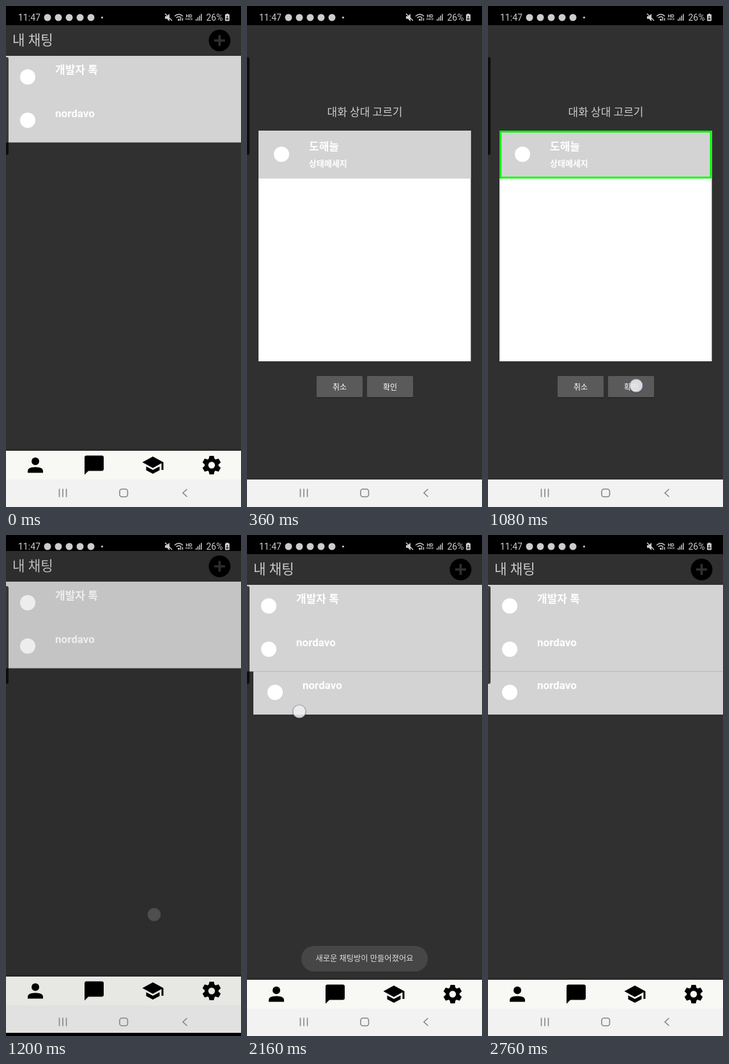
Write an HTML page that moves like this. It is 368 px wide and 784 px high and loops after 3.12 s.

```html
<!DOCTYPE html>
<html lang="ko">
<head>
<meta charset="utf-8">
<title>채팅</title>
<style>
html, body { margin: 0; width: 100%; height: 100%; overflow: hidden; background: #000; }
svg { display: block; width: 368px; height: 784px; }
text { font-family: Roboto, "Noto Sans CJK KR", "Noto Sans CJK", sans-serif; }
.bold { font-weight: 700; }
.mid { text-anchor: middle; }
.line { fill: none; stroke: #ccc; stroke-width: 1.4; }
</style>
</head>
<body>
<svg id="stage" viewBox="0 0 368 784"></svg>
<script>
const W = 368, H = 784, LOOP = 3120, STEP = 120, LAST = 2760;
const BG = '#303030', PALE = '#d3d3d3', INK = '#ccc', TAB = '#f8f8f4';
const ROW = 203 / 3;

const rect = (x, y, w, h, fill, more = '') =>
  `<rect x="${x}" y="${y}" width="${w}" height="${h}" fill="${fill}" ${more}/>`;
const circle = (x, y, r, fill, more = '') =>
  `<circle cx="${x}" cy="${y}" r="${r}" fill="${fill}" ${more}/>`;
const text = (x, y, size, fill, str, cls = '') =>
  `<text x="${x}" y="${y}" font-size="${size}" fill="${fill}" class="${cls}">${str}</text>`;
const path = (d, more = '') => `<path d="${d}" ${more}/>`;
const group = (id, body) => `<g id="${id}">${body}</g>`;
const times = (n, make) => Array.from({ length: n }, (_, i) => make(i)).join('');

// Tab icons, drawn around their own centre
const person = circle(0, -6, 6, '#000') + path('M-12 12v-3q0-6 12-6t12 6v3z');
const bubble = rect(-15, -15, 30, 24, '#000', 'rx="3"') + path('M-15-12V15l7-7z');
const cap = path('M-10.500 2v6L0 13.500 10.500 8V2L0 7.500zM0-13.500L-16.500-4.500 0 4.500 13.500-3V7.500h3v-12z'.replace(/\.500/g, '.5'));
const gear =
  times(6, i => path('M-5-8L-3.4-14.5H3.4L5-8z', `transform="rotate(${i * 60})"`)) +
  circle(0, 0, 10.7, '#000') + circle(0, 0, 5.2, TAB);

const tabs = times(4, i => rect(0, 692 + i, W, 1, '#000', `opacity="${0.04 * (i + 1)}"`)) +
  rect(0, 696, W, 45, TAB) +
  [person, bubble, cap, gear].map((icon, i) =>
    `<g transform="translate(${46 + i * 92} 718.5)">${icon}</g>`).join('');

const screen = rect(0, 0, W, H, BG) + rect(0, 0, W, 30, '#000') + rect(0, 741, W, 43, '#f2f2f2');

const row = (i, name) => {
  const y = 78 + i * ROW;
  return rect(0, y, W, ROW, PALE) + circle(34, y + 33, 12, '#fff') +
    text(77, y + 28, 17, '#fff', name, 'bold');
};

const chats = screen +
  text(10, 61, 21.2, INK, '내 채팅') +
  circle(334.5, 54, 17, '#000') +
  path('M326 54h17M334.5 45.5v17', `stroke="${BG}" stroke-width="3.6"`) +
  rect(0, 78, W, ROW * 2, PALE) + row(0, '개발자 톡') + row(1, 'nordavo') +
  group('newRow', row(2, 'nordavo')) + tabs +
  rect(0, 0, W, H, '#000', 'id="dim"');

const button = (x, label) =>
  rect(x, 580, 72, 34, '#292929', 'rx="2"') + rect(x, 579, 72, 33, '#5a5a5a', 'rx="1.5"') +
  text(x + 36, 600.5, 12, '#fff', label, 'mid');

const picker = screen +
  text(184.5, 171.5, 17, INK, '대화 상대 고르기', 'mid') +
  rect(18, 195, 332.5, 361, '#fff') +
  group('friend',
    rect(18, 195, 332.5, 75, PALE) + circle(54, 232, 12, '#fff') +
    text(97, 226, 17, '#fff', '도해늘', 'bold') +
    text(97, 250.5, 13, '#fff', '상태메세지', 'bold')) +
  rect(19.5, 196.5, 329.5, 72, 'none', 'id="chosen" stroke="#0f0" stroke-width="3"') +
  button(109, '취소') + button(188, '확인');

const toast = rect(85, 643, 198, 40, '#464646', 'rx="20"') +
  text(184, 667, 12.3, '#ddd', '새로운 채팅방이 만들어졌어요', 'mid');

const status =
  text(19, 23, 14, INK, '11:47') +
  times(5, i => circle(65 + i * 17, 18, 5.5, INK)) + circle(150.5, 18, 1.6, INK) +
  path('M249 16h3l4-4v12l-4-4h-3z', `fill="${INK}"`) + path('M249 12l11 11', 'class="line"') +
  path('M264 16q6.5-6 13 0M266.5 18.5q4-3.5 8 0M273.5 23v-4m3 0v4', 'class="line"') +
  circle(270.5, 21.5, 1.6, INK) +
  text(286.5, 17.5, 7.5, INK, 'HD', 'bold mid') + text(286.5, 22, 4, INK, 'VOICE', 'bold mid') +
  times(4, i => rect(297 + i * 2.7, 20.5 - i * 2.7, 1.5, 2.5 + i * 2.7, INK)) +
  text(313.5, 23, 14, INK, '26%') +
  rect(343, 13, 7, 10.5, INK, 'rx="1"') + rect(345, 12, 3, 2, INK) +
  circle(346.5, 17, 1.2, '#333') + rect(344.5, 19, 4, 2.5, '#333');

const nav = '<g id="nav" fill="none" stroke-width="1.6">' +
  times(3, i => path(`M${83.5 + i * 5.5} 755.5v13`)) +
  rect(178, 756, 12.5, 12, 'none', 'rx="3.5"') + path('M283.5 756l-6.5 6 6.5 6') + '</g>';

const stage = document.getElementById('stage');
stage.innerHTML = rect(0, 0, W, H, '#000') +
  group('chats', chats) + group('picker', picker) + group('toast', toast) +
  rect(-4, 80, 8, 153, '#000', 'rx="3" opacity=".72"') +
  status + nav +
  group('touch', circle(0, 1, 11.5, '#000', 'opacity=".12"') +
    circle(0, 0, 10, '#f4f4f4', 'fill-opacity=".85" stroke="#a9a9cc" stroke-width="1.2"'));

const el = {};
stage.querySelectorAll('[id]').forEach(n => el[n.id] = n);

const move = (node, x, y) => node.setAttribute('transform', `translate(${x} ${y})`);
const fade = (node, a) => node.setAttribute('opacity', Number(a));
const ramp = (t, from, to) => Math.min(1, Math.max(0, (t - from) / (to - from)));
const swing = (t, from, to) => Math.sin(Math.PI * ramp(t, from, to));

const taps = [
  { from: 120, hold: 120, x: 338, y: 54 },
  { from: 600, hold: 240, x: 122, y: 234 },
  { from: 960, hold: 240, x: 232, y: 594 }
];

function drawTouch(t, rowX) {
  const tap = taps.find(p => t >= p.from && t <= p.from + p.hold);
  if (tap) {
    move(el.touch, tap.x, tap.y);
    fade(el.touch, t < tap.from + tap.hold ? 1 : 0.2);
  } else {
    move(el.touch, 72 + rowX, 276 - 72 * ramp(t, 2160, 2400));
    fade(el.touch, t >= 2040 && t < 2640);
  }
}

function draw(ms) {
  const t = Math.min(Math.floor(ms % LOOP / STEP) * STEP, LAST);
  const open = ramp(t, 120, 360), close = ramp(t, 1080, 1320);
  const closing = t >= 1200;

  move(el.chats, 0, closing ? -10 * (1 - close) : -14 * open);
  fade(el.dim, closing ? 0.14 * (1 - close) : 0.1 * open);
  move(el.picker, 0, 516 * (1 - open) ** 2);
  fade(el.picker, closing ? 0 : Math.min(1, open * 1.83));
  fade(el.friend, t >= 360);
  fade(el.chosen, t >= 720);

  const rowX = 11.5 * swing(t, 2040, 2400) - 120 * swing(t, 2400, LAST);
  move(el.newRow, rowX, 0);
  fade(el.newRow, t >= 1440);
  fade(el.toast, ramp(t, 1320, 1560) - ramp(t, 2160, 2400));
  drawTouch(t, rowX);
  el.nav.setAttribute('stroke', open > 0 && open < 1 ? '#202020' : '#858585');
}

const start = performance.now();
function tick() {
  draw(performance.now() - start);
  requestAnimationFrame(tick);
}
tick();
</script>
</body>
</html>
```
